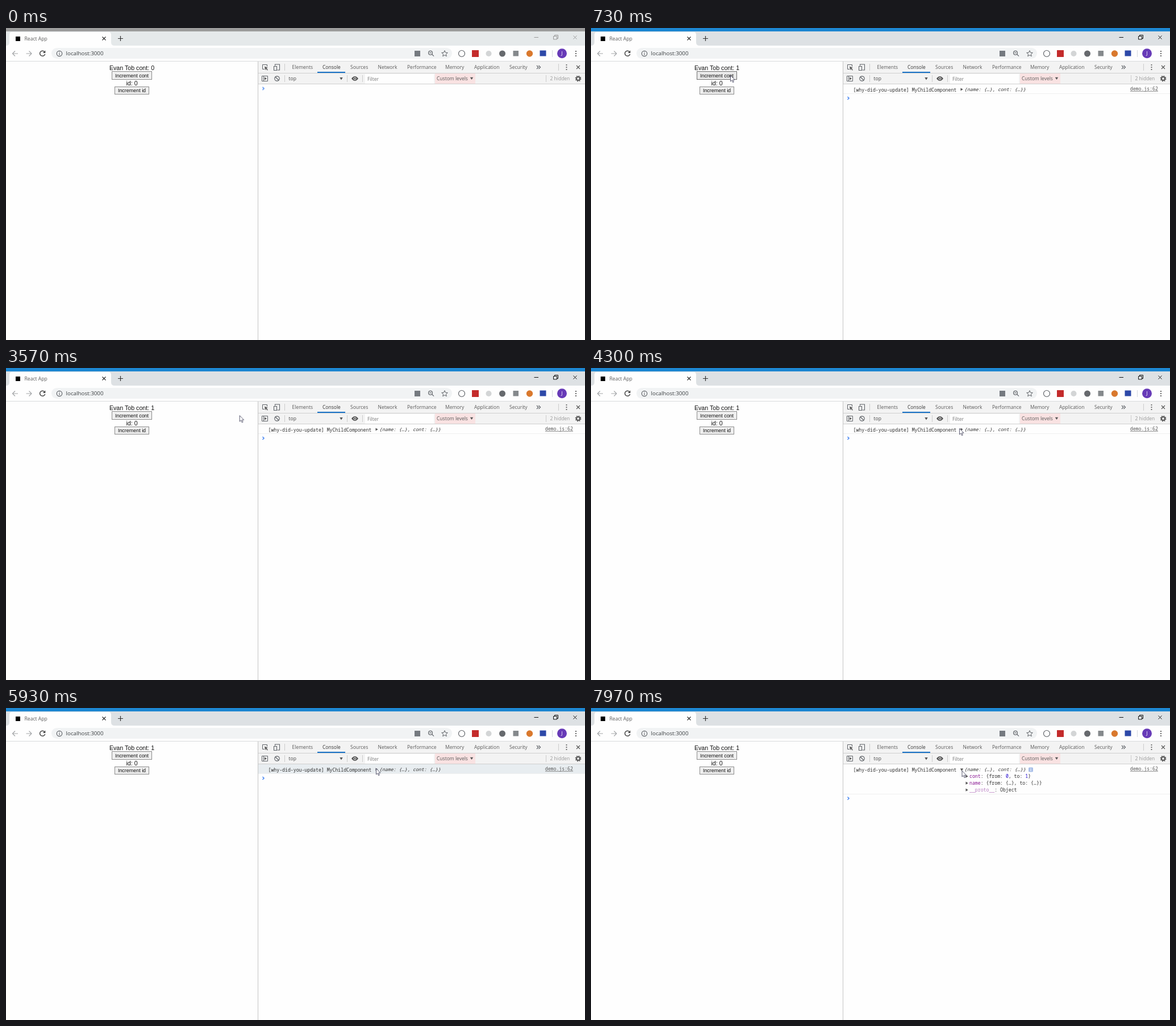
Recreate the animation shown at these times as an HTML page. Size 1019x549 px, loop 8000 ms.

```html
<!DOCTYPE html>
<html lang="en">
<head>
<meta charset="utf-8">
<title>Console demo</title>
<style>
html, body { margin: 0; width: 100%; height: 100%; overflow: hidden; background: #fefefe; }
svg { display: block; width: 100vw; height: 100vh; }
text { font: 8.5px "Open Sans", "Noto Sans", sans-serif; fill: #5a5a5a; white-space: pre; }
.page text { font: 10.67px "Liberation Sans", Arial, sans-serif; fill: #111; text-anchor: middle; }
.page .label { font-size: 8.95px; }
.code text { font: 8.2px "Noto Sans Mono", "DejaVu Sans Mono", monospace; fill: #303030; }
.code .sum { font-style: italic; }
.code .key { fill: #881391; }
.code .num { fill: #1c00cf; }
.code .dim { fill: #b77bc0; }
.line { fill: none; stroke: #5f6368; stroke-width: 1.2; }
.btn { fill: #efefef; stroke: #8c8c8c; }

.idle, .active, .zero, .one, .empty, .log, .shut, .open, .pick, .hover, .show {
  animation: 8s step-end infinite;
}
.idle { animation-name: idle; }
.active { animation-name: active; }
.zero { animation-name: zero; }
.one { animation-name: one; }
.empty { animation-name: empty; }
.log { animation-name: log; }
.shut { animation-name: shut; }
.open { animation-name: open; }
.pick { animation-name: pick; }
.hover { animation-name: hover; }
.show { animation-name: show; }
.pointer { animation: move 8s linear infinite; }

@keyframes idle { 0% { opacity: 1 } 6.25%, 100% { opacity: 0 } }
@keyframes active { 0% { opacity: 0 } 6.25%, 100% { opacity: 1 } }
@keyframes zero { 0% { opacity: 1 } 8.375%, 100% { opacity: 0 } }
@keyframes one { 0% { opacity: 0 } 8.375%, 100% { opacity: 1 } }
@keyframes empty { 0% { opacity: 1 } 9.1%, 100% { opacity: 0 } }
@keyframes log { 0% { opacity: 0 } 9.1%, 100% { opacity: 1 } }
@keyframes shut { 0% { opacity: 0 } 9.1% { opacity: 1 } 74.625%, 100% { opacity: 0 } }
@keyframes open { 0% { opacity: 0 } 74.625%, 100% { opacity: 1 } }
@keyframes pick { 0% { opacity: 0 } 61.25% { opacity: 1 } 74.625%, 100% { opacity: 0 } }
@keyframes hover { 0% { opacity: 0 } 5.875% { opacity: 1 } 42%, 100% { opacity: 0 } }
@keyframes show { 0% { opacity: 0 } 5.875% { opacity: 1 } 32.875% { opacity: 0 } 40%, 100% { opacity: 1 } }
@keyframes move {
  0%, 5.875% { transform: translate(250px, 84px) }
  6.625%, 40% { transform: translate(245px, 83px) }
  42% { transform: translate(270px, 77px) }
  45% { transform: translate(430px, 84px) }
  48% { transform: translate(587px, 98px) }
  50%, 50.875% { transform: translate(629px, 104px) }
  53.75%, 61.25% { transform: translate(648px, 106px) }
  62.875%, 71.625% { transform: translate(649px, 106px) }
  74.1%, 89.625% { transform: translate(651px, 106px) }
  92.875%, 98.375% { transform: translate(653px, 115px) }
  99.6%, 100% { transform: translate(652.5px, 110px) }
}
</style>
</head>
<body>
<svg viewBox="0 0 1019 549" preserveAspectRatio="none">
  <defs>
    <path id="right" d="M0-2.6 4.2 0 0 2.6z" fill="#555"/>
    <path id="down" d="M-2.7-2H2.7L0 2.4z" fill="#555"/>
    <path id="prompt" d="M0-2.5 2.6 0 0 2.5" fill="none" stroke="#367cf1" stroke-width="1.3"/>
    <path id="cross" d="M-3-3 3 3M3-3-3 3" fill="none"/>
    <g id="dots"><circle cy="-4" r="1.1"/><circle r="1.1"/><circle cy="4" r="1.1"/></g>
    <g id="controls" fill="none">
      <path d="M929.5 16.5h7.5M963.5 14.5h6v5.5h-6zM965.5 14.5v-2h6v6h-2"/>
      <use href="#cross" x="1001.5" y="16.5"/>
    </g>
  </defs>

  <!-- Window frame -->
  <rect width="1019" height="549" fill="#fefefe"/>
  <g class="idle">
    <rect width="1019" height="6" fill="#9c9c9c"/>
    <rect y="6" width="1019" height="25" fill="#e5e9ea"/>
    <use href="#controls" stroke="#999"/>
  </g>
  <g class="active">
    <rect width="1019" height="6" fill="#1c86d1"/>
    <rect y="6" width="1019" height="25" fill="#dde1e4"/>
    <use href="#controls" stroke="#111"/>
  </g>
  <path d="M0 31q6 0 6-6V12q0-5 5-5H180q5 0 5 5v13q0 6 6 6z" fill="#fefefe"/>
  <rect x="17" y="15" width="8" height="8" fill="#000"/>
  <text x="32.5" y="21.7" style="font-size:8.6px">React App</text>
  <use href="#cross" x="172.5" y="18.5" stroke="#333" stroke-width="1.2"/>
  <path d="M197 18.5h9M201.500 14v9" class="line" style="stroke:#333"/>

  <!-- Address bar -->
  <rect y="31" width="1019" height="28" fill="#fefefe"/>
  <rect x="80" y="35" width="705" height="19" rx="9.5" fill="#f1f3f4"/>
  <path d="M21 45H11.500M16 40.500 11.500 45l4.500 4.500M35.500 45H45M40.500 40.500 45 45l-4.500 4.500" class="line" style="stroke:#a3a5a8"/>
  <path d="M67.500 41.500A4.600 4.600 0 1 0 68.700 45.800" class="line" style="stroke:#444;stroke-width:1.500"/>
  <path d="M69.300 39.500v4.500h-4.500z" fill="#444"/>
  <circle cx="94" cy="45" r="4.700" class="line"/>
  <path d="M94 44.300v3.200M94 41.900v1.200" class="line"/>
  <text x="105.500" y="48.300" style="font-size:9.800px;fill:#3c4043">localhost:3000</text>
  <rect x="719" y="40" width="10" height="10" fill="#757a80"/>
  <circle cx="747" cy="43.700" r="3.400" class="line"/>
  <path d="M749.500 46.200 753 49.700M745.500 43.700h3" class="line"/>
  <path d="M772 39.700l1.500 3.500 3.800.3-2.900 2.500.9 3.700-3.300-2-3.300 2 .9-3.700-2.900-2.500 3.800-.3z" class="line" style="stroke-width:1"/>
  <circle cx="802" cy="45" r="5.500" class="line"/>
  <rect x="820" y="39" width="12" height="12" fill="#c32b2b"/>
  <circle cx="849.500" cy="45" r="5" fill="#d3d5d6"/>
  <circle cx="873.500" cy="45" r="5.500" fill="#66696d"/>
  <rect x="892.500" y="40" width="9.500" height="9.500" fill="#85898c"/>
  <circle cx="921.500" cy="45" r="5.700" fill="#d9782d"/>
  <rect x="939.500" y="39.500" width="11" height="10" fill="#2c48a8"/>
  <path d="M961.500 39v12" stroke="#d4d8dc"/>
  <circle cx="978.500" cy="44.700" r="8.500" fill="#673ab7"/>
  <text x="978.500" y="47.800" text-anchor="middle" style="fill:#fff">J</text>
  <use href="#dots" x="1003" y="45" fill="#444"/>
  <path d="M0 58.500H1019" stroke="#d9dbdc"/>

  <!-- Page -->
  <g class="page">
    <text class="zero" x="221.500" y="74">Evan Tob cont: 0</text>
    <text class="one" x="221.500" y="74">Evan Tob cont: 1</text>
    <rect class="btn" x="186.500" y="76.500" width="70" height="14"/>
    <rect class="hover" x="186.500" y="76.500" width="70" height="14" fill="#e9e9e9" stroke="#707070"/>
    <text class="label" x="221.500" y="86.700">Increment cont</text>
    <text x="221.500" y="101">id: 0</text>
    <rect class="btn" x="191.500" y="103.500" width="60" height="13"/>
    <text class="label" x="221.500" y="113">Increment id</text>
  </g>

  <!-- Developer tools -->
  <rect x="444" y="59" width="575" height="40" fill="#f3f3f3"/>
  <path d="M443.500 59V549" stroke="#c4c4c4"/>
  <path d="M444 79.500H1019M444 98.500H1019" stroke="#cfcfcf"/>
  <path d="M455 72.500h-3.500v-8h8v3.500" class="line" style="stroke-width:1"/>
  <path d="M455 67.500l6 2.500-2.500 1 2.500 2.800-1 1-2.700-2.700-1 2.400z" fill="#5a5a5a"/>
  <path d="M473.500 66.500v-2.500h8v10h-4M471.500 67.500h5v7h-5z" class="line" style="stroke-width:1.100"/>
  <path d="M490.500 63v12M972.500 63v12M490.500 83v12M600.500 83v12M627.500 83v12M950.500 83v12" stroke="#ccc"/>
  <g>
    <text x="503.500" y="72.200">Elements</text>
    <text x="557" y="72.200" style="fill:#333">Console</text>
    <text x="606" y="72.200">Sources</text>
    <text x="654.500" y="72.200">Network</text>
    <text x="706" y="72.200">Performance</text>
    <text x="773" y="72.200">Memory</text>
    <text x="824" y="72.200">Application</text>
    <text x="886" y="72.200">Security</text>
  </g>
  <rect x="548" y="77" width="49" height="2" fill="#1a73c8"/>
  <path d="M934 66l3 3-3 3M937.500 66l3 3-3 3" class="line"/>
  <use href="#dots" x="986.500" y="69" fill="#555"/>
  <use href="#cross" x="1007" y="69" stroke="#555" stroke-width="1.200"/>

  <path d="M450.500 84.500h10v9h-10zM453.500 84.500v9" class="line" style="stroke-width:1"/>
  <path d="M455 86.500l4 2.500-4 2.500z" fill="#5a5a5a"/>
  <circle cx="477" cy="89" r="4.200" class="line"/>
  <path d="M474 86l6 6" class="line"/>
  <text x="497.500" y="92.300" style="fill:#444">top</text>
  <use href="#down" x="590" y="89"/>
  <path d="M608 89q6-8 12 0-6 8-12 0z" fill="#555"/>
  <circle cx="614" cy="89" r="2" fill="#555" stroke="#f3f3f3"/>
  <rect x="632" y="81" width="121" height="17" fill="#fefefe"/>
  <text x="636" y="92.600" style="fill:#7a7a7a">Filter</text>
  <rect x="755" y="80" width="71" height="18" fill="#f9e2e2"/>
  <text x="758" y="92.300">Custom levels</text>
  <use href="#down" x="819.500" y="88.700"/>
  <text x="957.500" y="92.300" style="fill:#999">2 hidden</text>
  <circle cx="1007" cy="89" r="3" fill="none" stroke="#5a5a5a" stroke-width="2.200"/>
  <circle cx="1007" cy="89" r="4.600" fill="none" stroke="#5a5a5a" stroke-width="1.600" stroke-dasharray="1.800 1.813"/>

  <!-- Console -->
  <rect class="pick" x="444" y="99" width="575" height="16" fill="#e8edf0"/>
  <use class="empty" href="#prompt" x="451.500" y="106.500"/>
  <g class="code">
    <g class="log">
      <text x="461.500" y="111.500">[why-did-you-update] MyChildComponent</text>
      <text class="sum" x="657" y="110.800">{name: {…}, cont: {…}}</text>
      <text x="948.800" y="110.300" style="fill:#545454">demo.js:62</text>
      <path d="M949 111.500h49" stroke="#777" stroke-width=".8"/>
    </g>
    <g class="shut">
      <use href="#right" x="650.500" y="108"/>
      <path d="M444 115.500H1019" stroke="#efefef"/>
      <use href="#prompt" x="451.500" y="123.500"/>
    </g>
    <g class="open">
      <use href="#down" x="652.500" y="108.500"/>
      <rect x="770" y="104.500" width="8" height="8" rx="1.500" fill="#a9bfe8"/>
      <path d="M774 107.800v3M774 106v1" stroke="#fff"/>
      <use href="#right" x="659.500" y="120.200"/>
      <text x="666" y="123"><tspan class="key">cont</tspan>: {from: <tspan class="num">0</tspan>, to: <tspan class="num">1</tspan>}</text>
      <use href="#right" x="659.500" y="132.200"/>
      <text x="666" y="135"><tspan class="key">name</tspan>: {from: {…}, to: {…}}</text>
      <use href="#right" x="659.500" y="144.200"/>
      <text x="666" y="147"><tspan class="dim">__proto__</tspan>: Object</text>
      <path d="M444 151.500H1019" stroke="#efefef"/>
      <use href="#prompt" x="451.500" y="159"/>
    </g>
  </g>

  <g class="pointer">
    <path class="show" d="M.5.500V11l2.400-2.200 1.700 3.900 1.700-.7-1.700-3.800H8z" fill="#fff" stroke="#4a4a62" stroke-width=".9"/>
  </g>
</svg>
</body>
</html>
```
